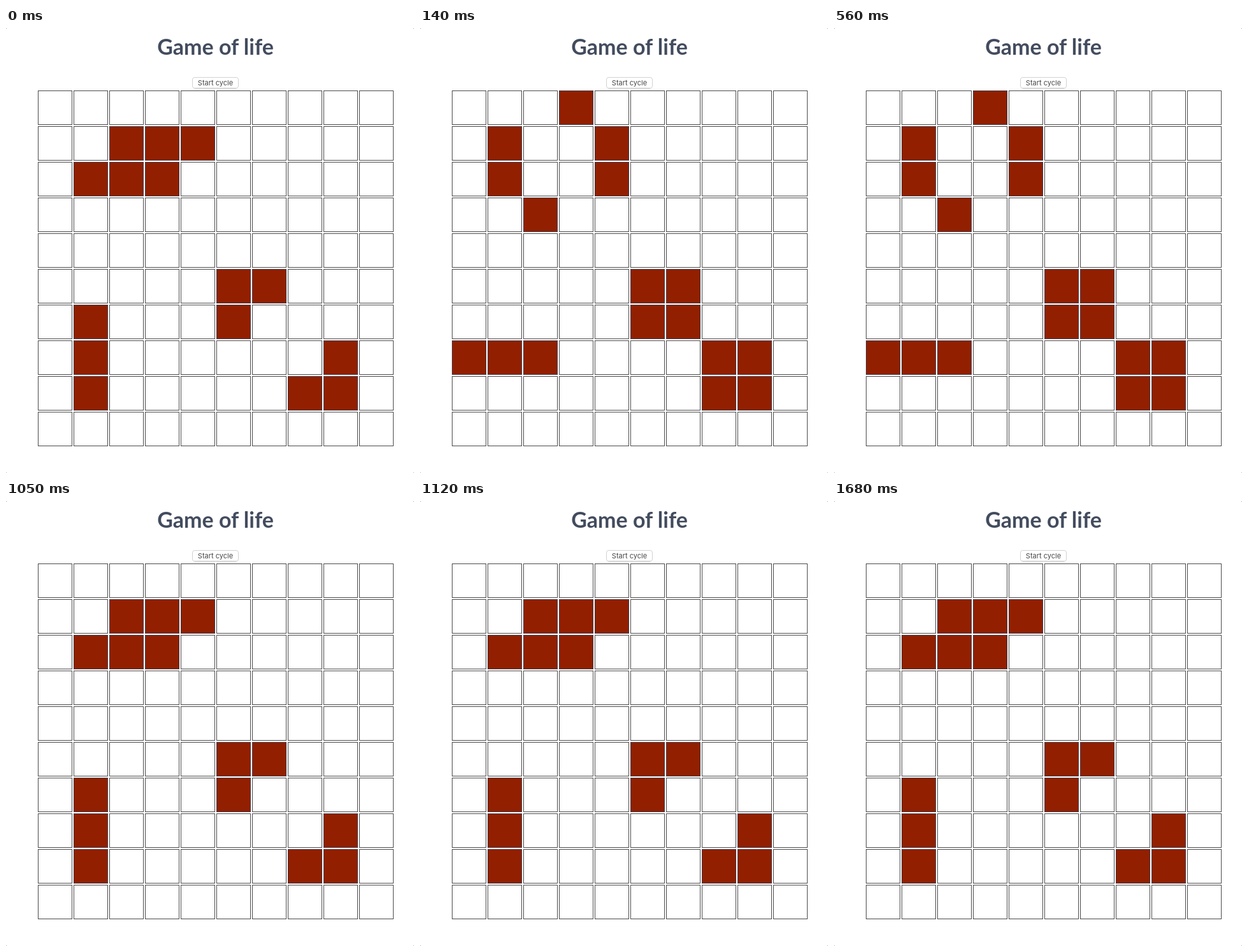
Recreate the animation shown at these times as an HTML page. Size 640 by 698 pixels, loop 2100 ms.

```html
<!DOCTYPE html>
<html lang="en">
<head>
<meta charset="utf-8">
<title>Game of life</title>
<style>
  html, body { margin: 0; width: 100%; height: 100%; overflow: hidden; background: #b4b4b4; }
  svg { display: block; }
  .title { font: 700 34px Lato, sans-serif; fill: #434c5e; }
  .label { font: 11px Inter, sans-serif; fill: #484848; }
  .cell { fill: #fff; stroke: #4b4b4b; }
  .live { fill: #921f00; stroke: #45404a; }
</style>
</head>
<body>
<svg width="640" height="698" text-anchor="middle">
  <rect width="640" height="698" rx="2.5" fill="#fff"/>
  <text class="title" x="328.5" y="42">Game of life</text>
  <rect x="292.5" y="77.5" width="72" height="17" rx="3.5" fill="#fff" stroke="#d2d2d2"/>
  <path d="M296 94.5h65" stroke="#bcbcbc"/>
  <text class="label" x="328.5" y="90">Start cycle</text>
  <g id="board"></g>
</svg>
<script>
const SIZE = 10, PITCH = 56, LOOP = 2100;
const TOGGLES = [140, 630, 1190, 1680];
const board = document.getElementById('board');

// Live cells as row-column pairs
const seed = new Set('12 13 14 21 22 23 55 56 65 61 71 81 78 87 88'.split(' ').map(Number));

const cells = Array.from({ length: SIZE * SIZE }, (_, i) => {
  const cell = document.createElementNS('http://www.w3.org/2000/svg', 'rect');
  const attrs = {
    x: 50.5 + i % SIZE * PITCH,
    y: 98.5 + Math.floor(i / SIZE) * PITCH,
    width: 53,
    height: 53
  };
  for (const name in attrs) cell.setAttribute(name, attrs[name]);
  return board.appendChild(cell);
});

function neighbours(live, i) {
  let count = 0;
  for (const other of live) {
    const dx = Math.abs(other % SIZE - i % SIZE);
    const dy = Math.abs(Math.floor(other / SIZE) - Math.floor(i / SIZE));
    if (Math.max(dx, dy) === 1) count++;
  }
  return count;
}

function evolve(live) {
  const next = new Set();
  cells.forEach((_, i) => {
    const n = neighbours(live, i);
    if (n === 3 || (n === 2 && live.has(i))) next.add(i);
  });
  return next;
}

const states = [seed, evolve(seed)];
const start = performance.now();
let shown = -1;

function draw(now) {
  const t = Math.max(0, now - start) % LOOP;
  const state = TOGGLES.filter(time => t >= time).length % 2;
  if (state !== shown) {
    shown = state;
    cells.forEach((cell, i) => {
      cell.setAttribute('class', states[state].has(i) ? 'cell live' : 'cell');
    });
  }
  requestAnimationFrame(draw);
}
draw(start);
</script>
</body>
</html>
```
